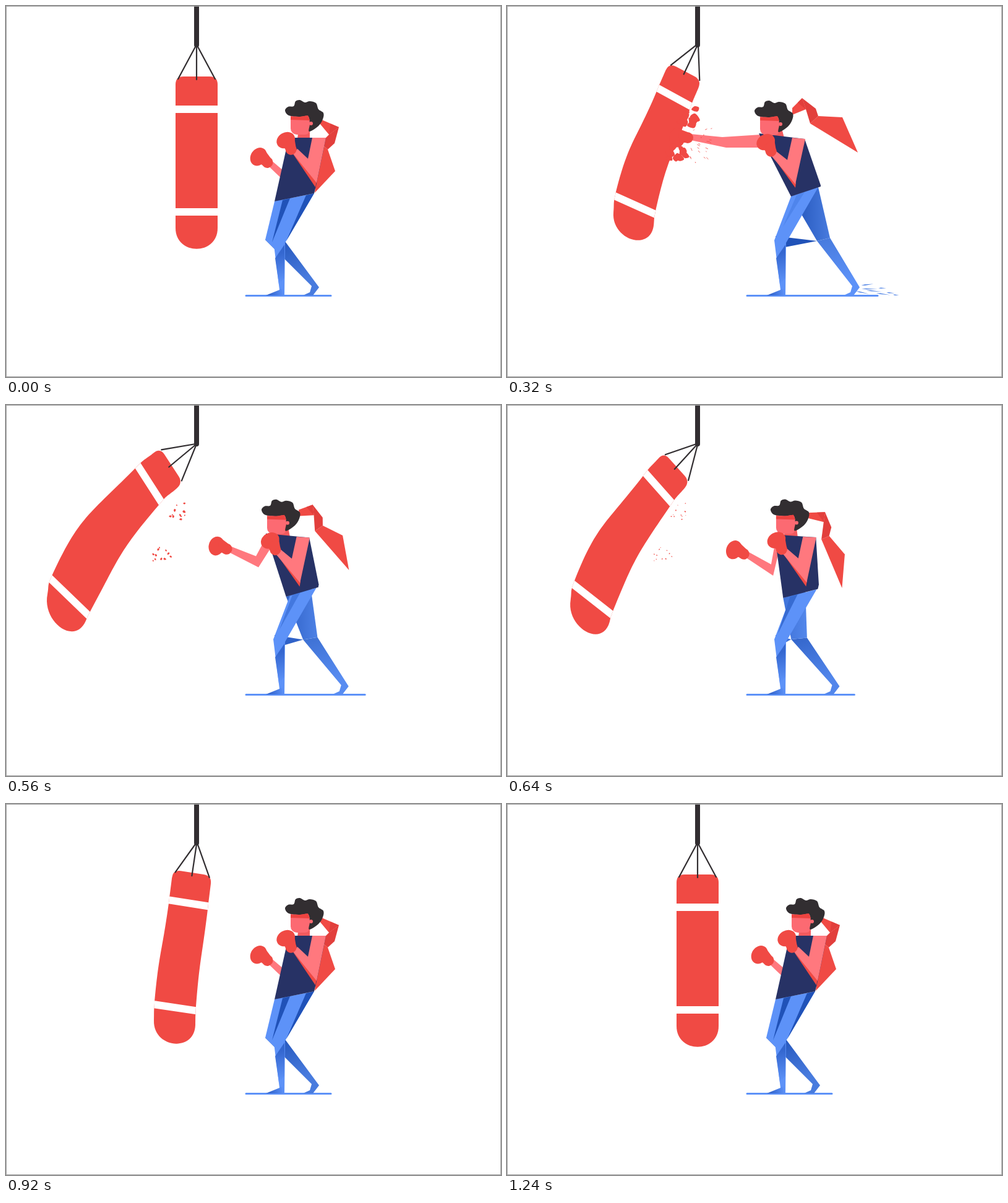
These frames come from a looping animation (800 by 600 pixels, 1.28 s). An HTML page with a canvas:

```html
<!DOCTYPE html>
<html lang="en">
<head>
<meta charset="utf-8">
<title>Boxer</title>
<style>
html, body { margin: 0; width: 100%; height: 100%; overflow: hidden; background: #fff; }
canvas { display: block; width: 800px; height: 600px; }
</style>
</head>
<body>
<canvas id="stage" width="800" height="600"></canvas>
<script>
const ctx = document.getElementById('stage').getContext('2d');
const LOOP = 1280, STEP = 40;
const RED = '#f04a44', DEEP = '#e23f3c', INK = '#322e31', NAVY = '#273265';
const PINK = '#ff787e', FACE = '#fc6a72', BLUE = '#5d92f8';

// ---- math ----
const clamp = v => Math.min(1, Math.max(0, v));
const smooth = v => { v = clamp(v); return v * v * (3 - 2 * v); };
const mix = (a, b, k) => a.map((v, i) => v + (b[i] - v) * k);
const rgb = c => `rgb(${c.map(Math.round)})`;
const pairs = a => a.flatMap((v, i) => i % 2 ? [] : [[v, a[i + 1]]]);
function unit(a, b) {
  const x = b[0] - a[0], y = b[1] - a[1], l = Math.hypot(x, y) || 1;
  return [x / l, y / l, l];
}
function toward(a, b, d) {
  const u = unit(a, b);
  return [a[0] + u[0] * d, a[1] + u[1] * d];
}
function seeded(s) {
  return () => (s = (s * 16807) % 2147483647) / 2147483647;
}

// ---- timing ----
// lunge: 0 on guard, 1 leaning in; reach: the punching arm; swing: the bag
const lunge = t => t < 320 ? smooth(t / 320) : 1 - smooth((t - 410) / 455);
const reach = t => t < 320 ? smooth(t / 280) : 1 - smooth(clamp((t - 320) / 550) ** .85);
function swing(t) {
  if (t < 560) return smooth((t - 80) / 485);
  const u = t - 560;
  if (u < 460) return Math.cos(u / 460 * Math.PI / 2) * Math.exp(-.0019 * u);
  return -.1 * Math.sin(Math.PI * clamp((u - 460) / 220));
}

// ---- drawing helpers ----
function poly(fill, a) {
  ctx.beginPath();
  pairs(a).forEach(q => ctx.lineTo(...q));
  ctx.closePath();
  ctx.fillStyle = fill;
  ctx.fill();
}
function oval(fill, x, y, rx, ry = rx) {
  ctx.beginPath();
  ctx.ellipse(x, y, rx, ry, 0, 0, 2 * Math.PI);
  ctx.fillStyle = fill;
  ctx.fill();
}
function blob(fill, a) {
  const q = pairs(a), n = q.length, at = i => q[(i + n) % n];
  ctx.beginPath();
  ctx.moveTo(...q[0]);
  for (let i = 0; i < n; i++) {
    const [o, b, c, d] = [at(i - 1), at(i), at(i + 1), at(i + 2)];
    ctx.bezierCurveTo(b[0] + (c[0] - o[0]) / 6, b[1] + (c[1] - o[1]) / 6,
      c[0] - (d[0] - b[0]) / 6, c[1] - (d[1] - b[1]) / 6, ...c);
  }
  ctx.fillStyle = fill;
  ctx.fill();
}
function line(a, b, width, color) {
  ctx.beginPath();
  ctx.moveTo(...a);
  ctx.lineTo(...b);
  ctx.lineWidth = width;
  ctx.strokeStyle = color;
  ctx.stroke();
}
function grad(x0, y0, x1, y1, a, b) {
  const g = ctx.createLinearGradient(x0, y0, x1, y1);
  g.addColorStop(0, a);
  g.addColorStop(1, b);
  return g;
}
function placed(x, y, angle, draw) {
  ctx.save();
  ctx.translate(x, y);
  ctx.rotate(angle * Math.PI / 180);
  draw();
  ctx.restore();
}

// ---- punching bag: corner, band, band, cap start down each side ----
const HANG = [-34, 34].flatMap(x => [114, 167, 333, 359].flatMap(y => [308 + x, y]));
const FLUNG = [249,69, 213,98, 72,281, 67,306, 286,126, 251,157, 133,340, 129,349];

// Smooth curve through the points, from the current position
function edge(q) {
  const n = q.length;
  const dir = q.map((_, i) => {
    const a = unit(q[Math.max(i - 1, 0)], q[Math.max(i, 1)]);
    const b = unit(q[Math.min(i, n - 2)], q[Math.min(i + 1, n - 1)]);
    return [(a[0] + b[0]) / 2, (a[1] + b[1]) / 2];
  });
  for (let i = 0; i < n - 1; i++) {
    const [a, b] = [q[i], q[i + 1]], h = unit(a, b)[2] * .5;
    ctx.bezierCurveTo(a[0] + dir[i][0] * h, a[1] + dir[i][1] * h,
      b[0] - dir[i + 1][0] * h, b[1] - dir[i + 1][1] * h, ...b);
  }
}

function drawBag(t) {
  const k = swing(t), q = pairs(mix(HANG, FLUNG, k));
  const L = q.slice(0, 4), R = q.slice(4), l0 = L[0], r0 = R[0];
  const side = s => [toward(s[0], s[1], 13), ...s.slice(1)];
  const cap = s => toward(s[3], s[2], -45);

  ctx.save();
  ctx.beginPath();
  ctx.moveTo(...toward(l0, r0, 13));
  ctx.lineTo(...toward(r0, l0, 13));
  ctx.quadraticCurveTo(...r0, ...side(R)[0]);
  edge(side(R));
  ctx.bezierCurveTo(...cap(R), ...cap(L), ...L[3]);
  edge(side(L).reverse());
  ctx.quadraticCurveTo(...l0, ...toward(l0, r0, 13));
  ctx.fillStyle = RED;
  ctx.fill();
  ctx.clip();
  for (const i of [1, 2]) line(toward(L[i], R[i], -8), toward(R[i], L[i], -8), 12, '#fff');
  ctx.restore();

  // hanger
  const [ux, uy] = unit(l0, r0), top = 66 - 3 * clamp(k * 2);
  const hook = (s, x, y) => { const e = mix(l0, r0, s); return [e[0] + x, e[1] + y]; };
  ctx.lineCap = 'round';
  line([306, top], hook(.06, 0, 4 * (1 - k)), 2.2, INK);
  line([308, top], hook(.5, -5 * uy, 5 * ux), 2.2, INK);
  line([310 - 2 * clamp(k), top], hook(.94, 0, 4 * (1 - k)), 2.2, INK);
  line([308, -5], [308, 63], 8, INK);
}

// ---- boxer ----
const HAIR = [451,169, 456,163, 465,162, 468,154, 475,152, 483,156, 491,154, 501,157,
  505,167, 513,173, 512,183, 505,194, 490,203, 491,190, 488,178, 475,179, 457,177];

function glove(x, y, angle) {
  placed(x, y, angle, () => {
    oval(RED, -4, 1, 12.5, 15.5);
    oval(RED, 13, 1, 9);
    poly(RED, [-3, -14, 13, -8, 13, 9, 0, 9]);
  });
}

function drawRibbon(p) {
  // knot, knot, fold, fold, bend, hinge, inner hinge, corner, tip
  const still = [508,183, 507,190, 538,196, 522,208, 531,222, 520,232, 508,222, 532,267, 499,302];
  const blown = [461,165, 461,176, 477,149, 483,167, 499,166, 503,178, 490,190, 542,180, 567,237];
  const lag = Math.sin(Math.PI * p) ** 2;
  const q = pairs(mix(still, blown, p))
    .map(([x, y], i) => [x + lag * Math.min(9, i * 3), y + lag * 26 * (i / 8) ** 3]);
  const part = (fill, ...ids) => poly(fill, ids.flatMap(i => q[i]));
  part(RED, 6, 5, 7, 8);
  part(DEEP, 2, 4, 5, 6, 3);
  part(RED, 0, 2, 3, 1);
  poly(DEEP, [...mix(q[0], q[2], .55), ...q[2], ...q[3]]);
}

function drawLegs(p) {
  const at = (a, b) => mix(a, b, p), tint = (a, b) => rgb(mix(a, b, p));
  const DARK = [32, 82, 184], MID = [72, 123, 222], LIGHT = [93, 146, 248];

  // trailing leg
  const hipL = at([434,316], [459,308]), hipR = at([462,308], [503,293]);
  const inner = at([419,378], [501,380]), outer = at([449,378], [522,375]);
  const dx = 64 * p;
  poly(grad(...inner, outer[0], 455, tint(DARK, MID), tint(MID, LIGHT)),
    [...inner, 494 + dx, 453, 491 + dx, 463, 480 + dx, 468, 496 + dx, 468, 506 + dx, 455, ...outer]);
  poly(grad(hipL[0], 340, outer[0], 340, tint(LIGHT, DARK), tint(LIGHT, MID)),
    [...hipL, ...hipR, ...outer, ...inner]);
  poly(tint(LIGHT, DARK), [...inner, 434, 372, 434, 393]);

  // planted leg, with a fold down the thigh and shade at its back
  const hip = at([498,303], [503,293]);
  poly(BLUE, [...at([458,311], [459,308]), ...hip, 451, 383, 450, 468, 442, 468, 442, 459, 432, 379]);
  poly(tint(DARK, [79, 133, 236]),
    [...at([447,314], [468,306]), ...at([459,311], [481,301]), ...at([430,382], [446,357])]);
  poly(rgb(DARK), [...mix([485,306], hip, clamp(p * 2)), ...hip, 453, 380]);
  poly(grad(438, 400, 446, 448, '#3467d0', BLUE), [435, 408, 450, 386, 450, 440, 441, 450]);
  poly(grad(422, 468, 449, 462, '#2b5dc6', BLUE), [442, 459, 420, 468, 450, 468, 450, 456]);
}

function drawBoxer(t) {
  const p = lunge(t), r = reach(t);
  const at = (a, b) => mix(a, b, p), shape = (fill, a, b) => poly(fill, at(a, b));

  ctx.lineCap = 'round';
  line([388, 468.5], [525 + 74 * p, 468.5], 3, BLUE);
  drawRibbon(p);

  // punching arm
  const [gx, gy, angle] = mix([412, 245, 33], [279, 212, 0], r);
  const [c, s] = [Math.cos(angle * Math.PI / 180), Math.sin(angle * Math.PI / 180)];
  const wrist = w => [gx + 18 * c - w * s, gy + 18 * s + w * c];
  poly(PINK, [...wrist(-5), ...mix([462,278], [348,212], r), ...at([460,214], [410,208]),
    ...at([464,236], [416,229]), ...mix([464,297], [354,229], r), ...wrist(5)]);
  glove(gx, gy, angle);

  drawLegs(p);

  // neck and torso
  shape('#f25a5e', [473,200, 491,196, 491,214, 471,214], [424,202, 444,198, 448,213, 424,210]);
  shape(NAVY, [457,213, 517,213, 501,291, 498,303, 434,316], [407,206, 481,215, 507,290, 507,292, 459,308]);

  // guarding arm
  shape(RED, [463,238, 502,284, 500,293], [428,241, 467,286, 466,294]);
  shape(PINK, [495,213, 517,213, 502,286, 463,238, 471,231, 488,247],
    [461,213, 482,215, 466,288, 426,241, 434,234, 453,249]);

  // head
  placed(-51 * p, p, 0, () => {
    ctx.beginPath();
    ctx.roundRect(460, 176, 31, 32, [0, 0, 8, 10]);
    ctx.fillStyle = FACE;
    ctx.fill();
    blob(INK, HAIR);
    poly('#ee4340', [460, 179, 475, 179, 488, 177, 491, 185, 460, 184]);
    oval(FACE, 493, 190, 3);
  });
  glove(455 - 34 * p, 220 + 3 * p, 60);
}

// ---- dust behind the heel ----
const rnd = seeded(77);
const DUST = Array.from({ length: 8 }, (_, i) => ({
  x: 110 - i * 8, y: 14 - rnd() * 22, len: 10 + rnd() * 26
}));

function drawDust(t) {
  const u = (t - 90) / 480;
  if (u <= 0 || u >= 1) return;
  const out = 1 - (1 - u) ** 3, w = 1.9 * (1 - u) ** 1.4;
  for (const { x, y, len } of DUST) {
    const tip = [539 + x * out, 456 + y * out], l = Math.min(len * (1 - u) * 1.4, x * out);
    const [a, b] = unit([0, 0], [x, y]), back = d => [tip[0] - a * d, tip[1] - b * d];
    const [mx, my] = back(l * .7);
    poly('#4c80e4', [...tip, mx - b * w, my + a * w, ...back(l), mx + b * w, my - a * w]);
  }
}

// ---- splash where the punch lands ----
const BURSTS = [
  { x: 318, y: 195, dx: -41, dy: -20, w: 12, h: 17 },
  { x: 308, y: 230, dx: -56, dy: 11, w: 15, h: 11 }
];
const CHIPS = Array.from({ length: 22 }, (_, i) => ({
  from: BURSTS[i % 2], x: rnd() * 2 - 1, y: rnd() * 2 - 1, r: 4 + rnd() * 5, spin: rnd() * 360
}));
const SPARKS = Array.from({ length: 20 }, () => ({ a: rnd() * 2.5 - .95, d: 18 + rnd() * 30, l: 1 + rnd() * 4 }));

function drawSplash(t) {
  const size = smooth((t - 180) / 140) * (1 - clamp((t - 320) / 480)) ** 1.7;
  if (size <= 0) return;
  const fly = 1 - (1 - clamp((t - 180) / 380)) ** 2;
  for (const { from: f, x, y, r, spin } of CHIPS) {
    const s = r * size;
    placed(f.x + f.dx * fly + x * f.w, f.y + f.dy * fly + y * f.h, spin,
      () => blob(RED, [-s, 0, -s * .2, -s * .8, s * .9, -s * .4, s * .4, s * .6]));
  }
  const u = (t - 220) / 200;
  if (u <= 0 || u >= 1) return;
  for (const { a, d, l } of SPARKS) {
    const far = d * (.6 + .7 * u), ray = v => [290 + Math.cos(a) * v, 214 + Math.sin(a) * v];
    line(ray(far), ray(far + l), 1.6 * (1 - u), RED);
  }
}

function draw(t) {
  ctx.fillStyle = '#fff';
  ctx.fillRect(0, 0, 800, 600);
  drawBag(t);
  drawBoxer(t);
  drawSplash(t);
  drawDust(t);
  ctx.lineWidth = 1;
  ctx.strokeStyle = '#a0a0a0';
  ctx.strokeRect(.5, .5, 799, 599);
}

function frame() {
  draw(Math.floor(performance.now() % LOOP / STEP) * STEP);
  requestAnimationFrame(frame);
}
frame();
</script>
</body>
</html>
```
